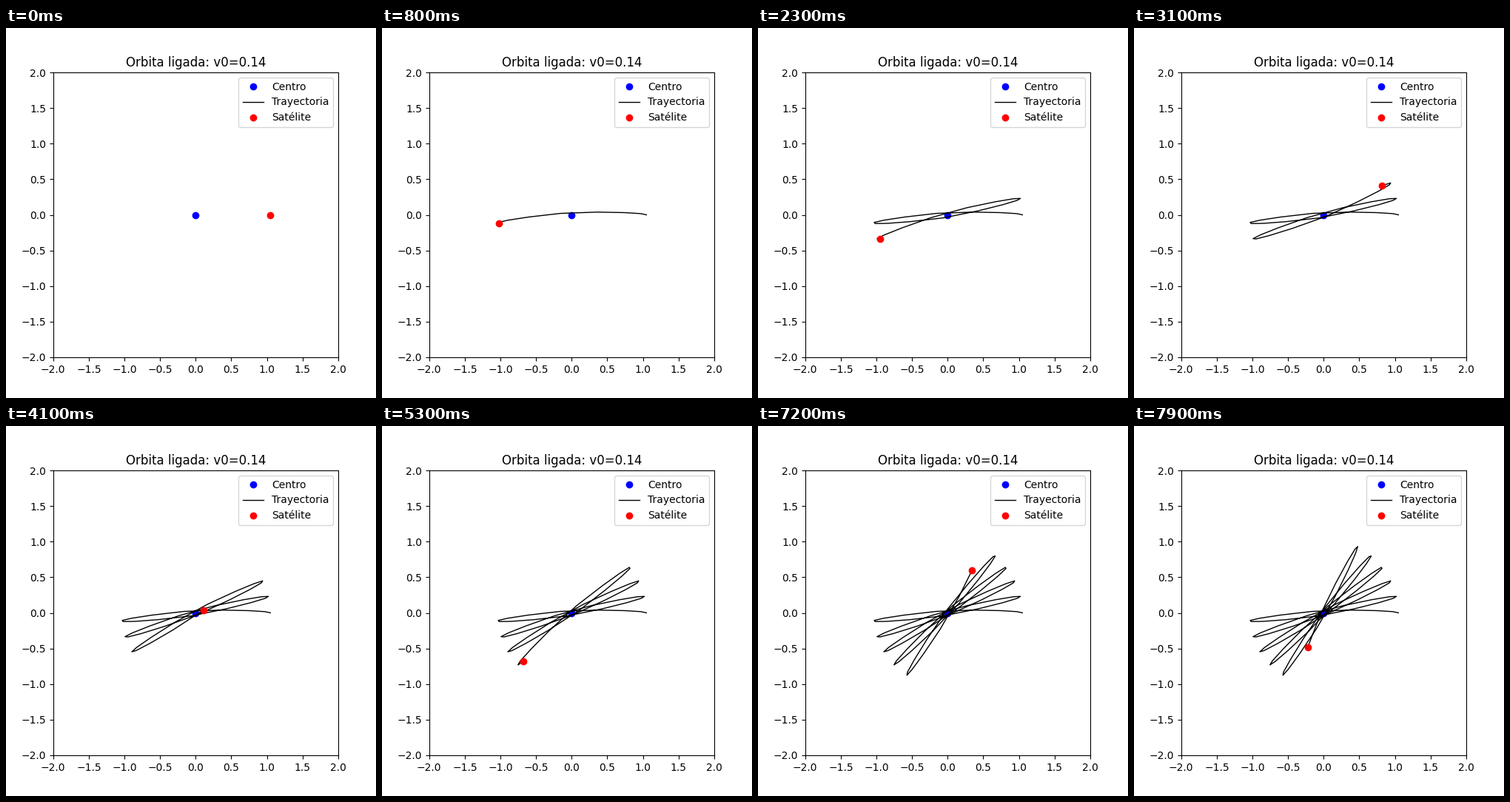
Write a matplotlib script that moves like this. It is 500 px wide and 500 px high and loops after 8000 ms.

```python
import numpy as np
import matplotlib.pyplot as plt
from matplotlib.animation import FuncAnimation

FRAMES = 80
INTERVAL = 100  # ms
DT = 0.125      # simulated time per frame
SUBSTEPS = 500
G = 9.8         # constant pull towards the centre
R0 = 1.05
V0 = 0.14


def pull(z):
    return -G * z / abs(z)


def orbit():
    """Leapfrog integration in the complex plane, one point per frame."""
    h = DT / SUBSTEPS
    z, v = complex(R0, 0), complex(0, V0)
    points = [z]
    for _ in range(FRAMES - 1):
        for _ in range(SUBSTEPS):
            v += pull(z) * h / 2
            z += v * h
            v += pull(z) * h / 2
        points.append(z)
    return np.array(points)


path = orbit()

fig, ax = plt.subplots(figsize=(5, 5), dpi=100)
ax.set_aspect("equal")
ax.set_xlim(-2, 2)
ax.set_ylim(-2, 2)
ax.set_title(f"Orbita ligada: v0={V0:.2f}")

ax.plot([0], [0], "o", color="blue", label="Centro")
trail, = ax.plot([], [], "-", color="black", lw=1, label="Trayectoria")
sat, = ax.plot([], [], "o", color="red", label="Satélite")
ax.legend(loc="upper right")


def draw(i):
    seen = path[:i + 1]
    trail.set_data(seen.real, seen.imag)
    sat.set_data(seen.real[-1:], seen.imag[-1:])
    return trail, sat


anim = FuncAnimation(fig, draw, frames=FRAMES, interval=INTERVAL,
                     repeat=True, repeat_delay=0)
plt.show()
```
